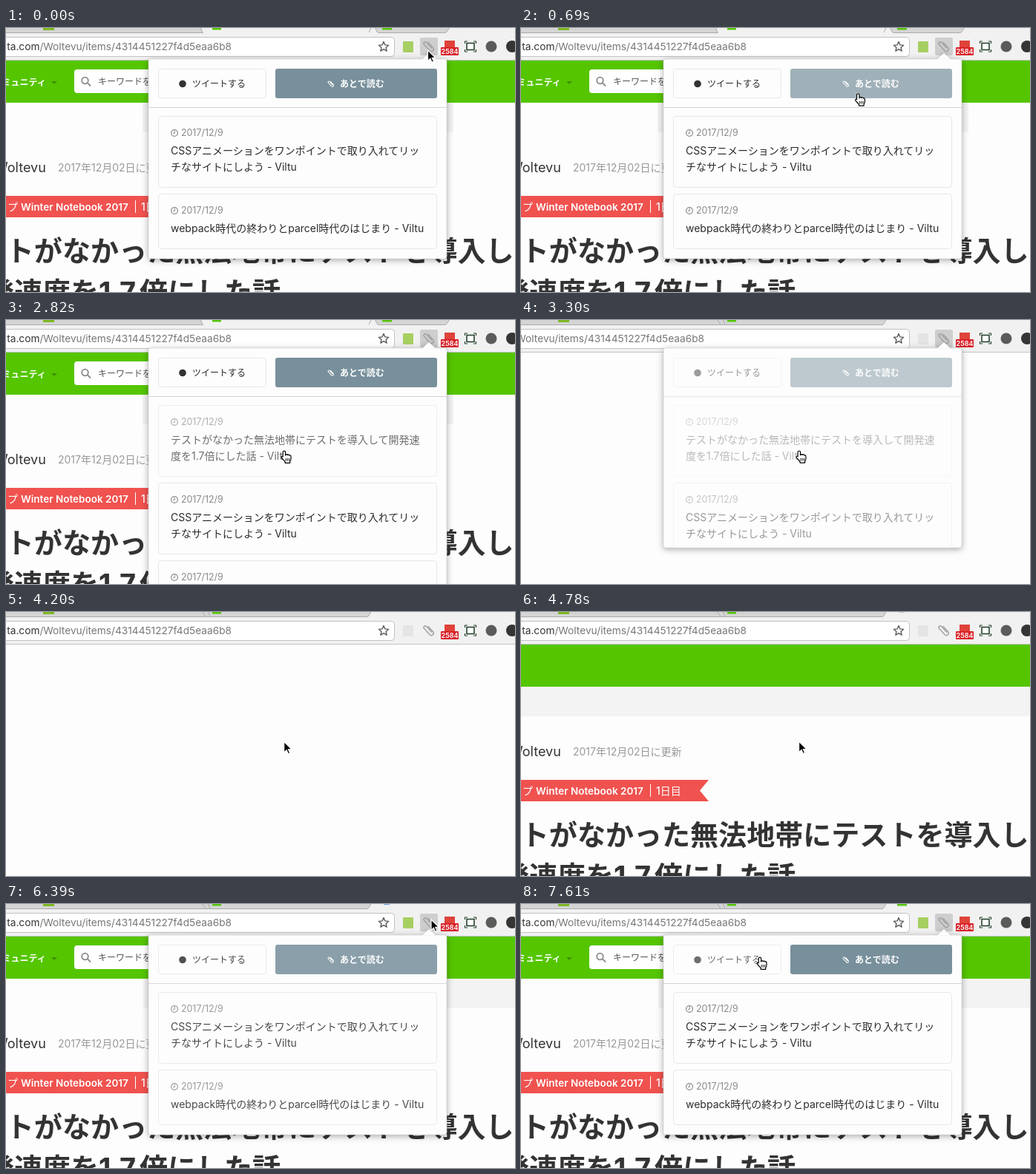
Animation of 686x357 px, one loop 8000 ms. Source, as an HTML page:

```html
<!DOCTYPE html>
<html lang="ja">
<head>
<meta charset="utf-8">
<title>Read later popup</title>
<style>
html, body { margin: 0; width: 100%; height: 100%; overflow: hidden; background: #fff; }
svg { display: block; width: 686px; height: 357px; font-family: Inter, "Noto Sans CJK JP", "Noto Sans CJK", sans-serif; }
text { white-space: pre; }
.outline { fill: #fdfdfd; stroke: #e7e7e7; }
.date { font-size: 12.4px; fill: #8a8a8a; }
.title { font-size: 14px; fill: #2c2c2c; }
.label { font-size: 12px; font-weight: 500; }
.strong { font-weight: 700; }
.heading { font-size: 38px; font-weight: 700; fill: #333; }
#window { filter: drop-shadow(0 2px 4px rgba(0, 0, 0, .32)); }
</style>
</head>
<body>
<svg viewBox="0 0 686 357" xmlns="http://www.w3.org/2000/svg">
  <defs>
    <clipPath id="windowClip"><rect id="clipRect" x="192" y="42" width="402" height="270"/></clipPath>
    <path id="paperclip" d="M2-3V3.2a2 2 0 0 1-4 0V-4.2a1.4 1.4 0 0 1 2.8 0V2.6" fill="none" stroke-linecap="round" transform="rotate(-42)"/>
  </defs>

  <rect width="686" height="357" fill="#fdfdfd"/>

  <g id="page">
    <rect id="subnav" y="101" height="40" fill="#f3f3f3"/>
    <rect y="44" width="686" height="57" fill="#55c500"/>
    <g id="nav">
      <text x="-17.500" y="78" class="label strong" fill="#fff">コミュニティ</text>
      <path d="M61 72h8l-4 4z" fill="#3d9100"/>
      <rect x="92" y="56" width="240" height="32" rx="4" fill="#fff"/>
      <g fill="none" stroke="#8a8a8a" stroke-width="1.8">
        <circle cx="106.500" cy="71" r="4.300"/><path d="M109.700 74.200L114 78.500"/>
      </g>
      <text x="124" y="76.500" class="label" fill="#555">キーワードを入力</text>
    </g>
    <text x="-15" y="195" font-size="18" fill="#333">Woltevu</text>
    <text x="70" y="194" font-size="14" fill="#999">2017年12月02日に更新</text>
    <path d="M0 227H253L241 241.500 253 256H0z" fill="#f0524f"/>
    <g fill="#fff" font-size="14" font-weight="500">
      <text x="2" y="247">プ</text>
      <text x="20" y="247" font-size="13.500" font-weight="600">Winter Notebook 2017</text>
      <rect x="174" y="233" width="1" height="17"/>
      <text x="182" y="247">1日目</text>
    </g>
    <g class="heading">
      <text x="-76.300" y="314.500" style="font-size:38.05px">テストがなかった無法地帯にテストを導入し</text>
      <text x="-27" y="371">発速度を</text>
      <text x="125" y="371">1.7</text>
      <text x="180" y="371">倍にした話</text>
    </g>
  </g>

  <rect width="686" height="43" fill="#f1f1f1"/>
  <rect y="43" width="686" height="1" fill="#c4c4c4"/>
  <path d="M-5-1H492.500L489 5Q488 6.500 486 6.500H-5z" fill="#d5d5d5" stroke="#ababab"/>
  <path d="M264-1L269 6M272-1L275 6" stroke="#ababab" fill="none"/>
  <g id="firstTabs">
    <path d="M262-1L266 7H489L492.500-1z" fill="#f1f1f1"/>
    <path d="M262-1L265 6M492.500-1L489 6" stroke="#ababab" fill="none"/>
    <path d="M497-1L500 5Q501 6.500 503 6.500H591Q593 6.500 594 5L598-1z" fill="#d5d5d5" stroke="#ababab"/>
  </g>
  <rect x="50" width="15" height="3" fill="#7db821"/>
  <rect x="278" width="12" height="2.500" fill="#55c500"/>
  <rect id="tabIcon" x="507" width="13" height="2.500" fill="#55c500"/>
  <rect id="spinner" x="509" width="8" height="1"/>
  <rect x="-10.500" y="12.500" width="534" height="26" rx="4" fill="#fff" stroke="#c2c2c2"/>
  <text id="url" y="30" font-size="13.700" text-anchor="end" fill="#777"><tspan fill="#333">ta.com</tspan>/Woltevu/items/4314451227f4d5eaa6b8</text>
  <path id="star" fill="none" stroke="#5a5a5a" stroke-width="1.400" stroke-linejoin="round"/>
  <rect id="noteIcon" x="535" y="18" width="14" height="15" rx="1"/>
  <rect id="clipActive" x="558" y="13" width="24" height="24" rx="2" fill="#cecece"/>
  <use href="#paperclip" transform="translate(570 25) scale(1.500)" stroke="#a2a2a2"/>
  <rect x="591" y="17" width="14" height="12" fill="#e0433a"/>
  <rect x="586" y="26" width="24" height="11" rx="1" fill="#d8232a"/>
  <text x="598" y="35" font-size="9" font-weight="600" text-anchor="middle" fill="#fff">2584</text>
  <g fill="none" stroke="#27452f">
    <rect x="621" y="20.500" width="10" height="9" fill="#fff" stroke-width="1.600"/>
    <path d="M618.500 21V18H622M630 18h3.500V21M633.500 29V32H630M622 32h-3.500V29" stroke-width="1.200"/>
  </g>
  <circle cx="654" cy="25" r="7.500" fill="#5b5b5b"/>
  <circle cx="682" cy="25" r="8" fill="#353535"/>

  <g id="popup">
    <g id="window" fill="#fdfdfd" stroke="#cfcfcf" stroke-width=".6">
      <rect id="windowRect" x="192" y="42" width="402" height="270" rx="3"/>
      <path d="M561 42.500L570 34 579 42.500" stroke="none"/>
    </g>
    <g clip-path="url(#windowClip)">
      <g id="content">
        <g id="tweet">
          <rect class="outline" x="205.500" y="55.500" width="145" height="39" rx="3"/>
          <circle cx="238" cy="75.500" r="4.800" fill="#333"/>
          <text x="251" y="79.700" class="label" fill="#2c2c2c">ツイートする</text>
        </g>
        <g id="later">
          <rect x="363" y="55" width="218" height="40" rx="3" fill="#78909c"/>
          <use href="#paperclip" transform="translate(438 75.500) scale(.850)" stroke="#fff" stroke-width="1.200"/>
          <text x="450" y="79.700" class="label strong" fill="#fff">あとで読む</text>
        </g>
        <rect x="192" y="107" width="402" height="1" fill="#d2d2d2"/>
        <g id="added"></g>
        <g id="saved"></g>
      </g>
    </g>
  </g>

  <g id="arrow">
    <path d="M0 0V14.500L3.400 11.300 5.600 16.400 8 15.400 5.800 10.400H10.400z" stroke="#fff" stroke-width="1.200"/>
  </g>
  <g id="hand">
    <path d="M5 1.200c1 0 1.600.7 1.600 1.600V7c.4-1.400 2.500-1.500 2.800-.3.500-.9 2.300-.7 2.500.5.700-.5 2.100-.1 2.100 1.200v3.200c0 1.500-1 2.800-1.300 4.100v1.600H6.200v-1.400C5.200 14.200 2.600 12 1.400 10.200.6 8.800 2 7.800 3.200 8.800v-6C3.200 1.900 4 1.200 5 1.200z" fill="#fff" stroke="#000" stroke-width="1.200" stroke-linejoin="round" transform="translate(-5)"/>
    <path d="M2.200 11v3.700M4.400 11v3.700M6.600 11v3.700" stroke="#000" stroke-width=".9"/>
  </g>
</svg>
<script>
const LOOP = 8000;
const $ = id => document.getElementById(id);
const show = (id, on) => $(id).setAttribute('visibility', on ? 'visible' : 'hidden');
const move = (id, x, y) => $(id).setAttribute('transform', `translate(${x} ${y})`);
const fade = (id, alpha) => $(id).setAttribute('opacity', alpha);

const card = (y, ...lines) => `
  <rect class="outline" x="205.5" y="${y + .5}" width="375" height="${53 + 22 * lines.length - 1}" rx="4"/>
  <g fill="none" stroke="#8a8a8a"><circle cx="227" cy="${y + 23}" r="4.4" stroke-width="1.2"/><path d="M227.3 ${y + 20}v3.4h-2.3"/></g>
  <text class="date" x="236" y="${y + 27.2}">2017/12/9</text>` +
  lines.map((line, i) => `<text class="title" x="222" y="${y + 52 + 22 * i}">${line}</text>`).join('');

$('added').innerHTML = card(119, 'テストがなかった無法地帯にテストを導入して開発速', '度を1.7倍にした話 - Viltu');
$('saved').innerHTML =
  card(119, 'CSSアニメーションをワンポイントで取り入れてリッ', 'チなサイトにしよう - Viltu') +
  card(224, 'webpack時代の終わりとparcel時代のはじまり - Viltu');

$('star').setAttribute('d', 'M' + Array.from({ length: 10 }, (_, i) => {
  const r = i % 2 ? 3.2 : 7, a = i * Math.PI / 5;
  return [509 + r * Math.sin(a), 25.5 - r * Math.cos(a)].map(v => v.toFixed(2));
}).join('L') + 'z');

// Keys are [time, ...values], interpolated linearly.
function track(keys, t) {
  const next = keys.findIndex(k => k[0] > t);
  if (next === 0) return keys[0].slice(1);
  if (next < 0) return keys[keys.length - 1].slice(1);
  const a = keys[next - 1], b = keys[next];
  const p = (t - a[0]) / (b[0] - a[0]);
  return a.slice(1).map((v, i) => v + (b[i + 1] - v) * p);
}

const pointer = [
  [0, 568.5, 30], [80, 568.5, 30], [180, 535, 55], [350, 479, 85],
  [480, 479, 85], [780, 444, 89], [1040, 419, 86],
  [1940, 419, 86], [2200, 392, 130], [2470, 378, 176], [2819, 378, 176], [2820, 375, 176],
  [5100, 374.5, 175], [5350, 430, 125], [5700, 545, 40], [5930, 573, 21],
  [6880, 573, 21], [7100, 490, 70], [7350, 378, 88], [7610, 322, 71]
];
const laterAlpha = [[120, 1], [300, .7], [1990, .7], [2250, 1], [7000, 1], [7120, .7], [7280, .7], [7480, 1]];
const addedAlpha = [[2150, 1], [2450, .68]];
const tweetAlpha = [[7360, 1], [7600, .7]];
const contentAlpha = [[3140, 1], [3400, .15], [6100, .15], [6450, 1]];

const inside = (x, y, left, top, right, bottom) => x > left && x < right && y > top && y < bottom;

function render(t) {
  const leaving = t >= 3180, loaded = t >= 4780, complete = t >= 5200;
  const open = t < 3420 || t >= 6170;
  const grown = t >= 1460 && t < 3420;
  const offset = grown ? -4 : 0;

  show('page', !leaving || loaded);
  show('nav', !leaving || complete);
  const [left, right] = !leaving ? [184, 603] : complete ? [185, 686] : [0, 686];
  $('subnav').setAttribute('x', left);
  $('subnav').setAttribute('width', right - left);

  $('url').setAttribute('x', leaving && t < 4080 ? 247 : 304);
  $('noteIcon').setAttribute('fill', leaving && !complete ? '#e4e4e4' : '#a6cf62');
  show('firstTabs', !leaving);
  show('tabIcon', !leaving || t >= 6930);
  show('spinner', t >= 4430 && t < 6930);
  $('spinner').setAttribute('fill', complete ? '#6b9de0' : '#c4c4c4');

  const height = grown && !leaving ? 375 : 270;
  $('windowRect').setAttribute('height', height);
  $('clipRect').setAttribute('height', height);
  $('popup').style.display = open ? '' : 'none';
  $('added').style.display = grown ? '' : 'none';
  show('clipActive', open);
  move('popup', 0, offset);
  move('saved', 0, grown ? 105 : 0);
  fade('content', track(contentAlpha, t));
  fade('later', track(laterAlpha, t));
  fade('added', track(addedAlpha, t));
  fade('tweet', track(tweetAlpha, t));

  const [x, y] = track(pointer, t), py = y - offset;
  const hand = open && (inside(x, py, 363, 55, 581, 95) || inside(x, py, 205, 55, 351, 95) ||
    inside(x, py, 205, 119, 581, 216));
  show('hand', hand);
  show('arrow', !hand);
  move(hand ? 'hand' : 'arrow', x, y);
}

const start = performance.now();
function tick() {
  render((performance.now() - start) % LOOP);
  requestAnimationFrame(tick);
}
tick();
</script>
</body>
</html>
```
